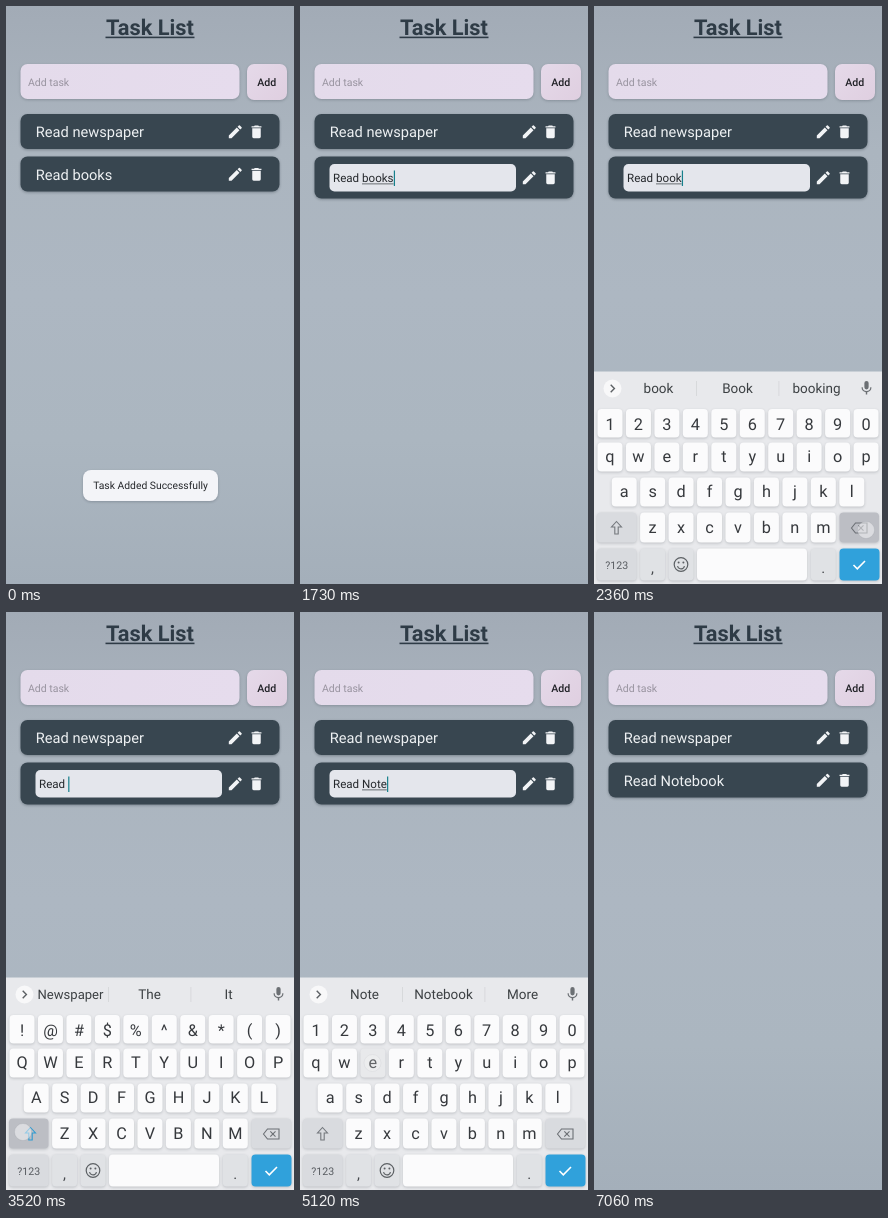
An HTML page with a canvas that plays this animation: 288 by 578 pixels, repeating every 7300 ms.

```html
<!DOCTYPE html>
<html lang="en">
<head>
<meta charset="utf-8">
<title>Task List</title>
<style>
html, body { margin: 0; width: 100%; height: 100%; overflow: hidden; background: #abb5c0; }
canvas { display: block; width: 288px; height: 578px; }
</style>
</head>
<body>
<canvas id="stage"></canvas>
<script>
const W = 288, H = 578, LOOP = 7300;
const canvas = document.getElementById('stage');
const ctx = canvas.getContext('2d');
const dpr = window.devicePixelRatio || 1;
canvas.width = W * dpr;
canvas.height = H * dpr;
ctx.scale(dpr, dpr);
ctx.textRendering = 'geometricPrecision';

const PENCIL = new Path2D('M3 17.25V21h3.75L17.81 9.94l-3.75-3.75L3 17.25zM20.71 7.04a1 1 0 0 0 0-1.41l-2.34-2.34a1 1 0 0 0-1.41 0l-1.83 1.83 3.75 3.75 1.83-1.83z');
const TRASH = new Path2D('M6 19a2 2 0 0 0 2 2h8a2 2 0 0 0 2-2V7H6v12zM19 4h-3.5l-1-1h-5l-1 1H5v2h14V4z');
const MIC = new Path2D('M12 14a3 3 0 0 0 3-3V5a3 3 0 0 0-6 0v6a3 3 0 0 0 3 3zm5.3-3a5.3 5.3 0 0 1-10.6 0H5a7 7 0 0 0 6 6.9V21h2v-3.1A7 7 0 0 0 19 11z');

const EDIT = 1610, KB_IN = 1760, SHIFT = 3480, UNSHIFT = 3800, DONE = 6570;

// [time, word being typed, suggestions]
const STEPS = [
  [0, 'books', 'books Books bookstore'],
  [2330, 'book', 'book Book booking'],
  [2540, 'boo', 'boo Boo book'],
  [2720, 'bo', 'bo Bo both'],
  [2880, 'b', 'b be by'],
  [3000, '', 'newspaper the it'],
  [SHIFT, '', 'Newspaper The It'],
  [UNSHIFT, 'N', 'N Not New'],
  [4210, 'No', 'No Not Now'],
  [4590, 'Not', 'Not Note Nothing'],
  [4970, 'Note', 'Note Notebook More'],
  [5250, 'Noteb', 'Noteb Notebook Notebooks'],
  [5530, 'Notebo', 'Notebo Notebook Notebooks'],
  [5790, 'Noteboo', 'Noteboo Notebook Notebooks'],
  [6170, 'Notebook', 'Notebook Notebooks']
];

// [start, end, key, touch x, touch y]
const PRESSES = [
  [2320, 3060, 'back', 272, 524], [3460, 3580, 'shift', 17, 520],
  [3770, 3880, 'n', 201, 521], [4190, 4290, 'o', 243.5, 451],
  [4560, 4660, 't', 129.5, 451], [4940, 5040, 'e', 72.5, 451],
  [5220, 5320, 'b', 172.5, 521], [5500, 5600, 'o', 243.5, 451],
  [5770, 5860, 'o', 243.5, 451], [6140, 6240, 'k', 229.5, 486],
  [6520, 6610, 'enter', 265, 559]
];

const clamp = v => Math.max(0, Math.min(1, v));
const span = (t, a, b) => clamp((t - a) / (b - a));
const easeOut = p => 1 - (1 - p) ** 3;

function box(x, y, w, h, r, fill, shadow = 0) {
  ctx.save();
  if (shadow) {
    ctx.shadowColor = `rgba(30,40,50,${shadow})`;
    ctx.shadowBlur = 3 * dpr;
    ctx.shadowOffsetY = dpr;
  }
  ctx.fillStyle = fill;
  ctx.beginPath();
  ctx.roundRect(x, y, w, h, r);
  ctx.fill();
  ctx.restore();
}

function text(str, x, y, size, color, align = 'left', weight = 400) {
  ctx.font = `${weight} ${size}px Roboto, "Noto Sans", sans-serif`;
  ctx.textAlign = align;
  ctx.fillStyle = color;
  ctx.fillText(str, x, y);
  return ctx.measureText(str).width;
}

function icon(path, cx, cy, size, color) {
  ctx.save();
  ctx.translate(cx - size / 2, cy - size / 2);
  ctx.scale(size / 24, size / 24);
  ctx.fillStyle = color;
  ctx.fill(path);
  ctx.restore();
}

function poly(points, color, width, close) {
  ctx.beginPath();
  points.forEach(([x, y]) => ctx.lineTo(x, y));
  if (close) ctx.closePath();
  ctx.strokeStyle = color;
  ctx.lineWidth = width;
  ctx.stroke();
}

function disc(x, y, r, fill) {
  ctx.beginPath();
  ctx.arc(x, y, r, 0, 7);
  ctx.fillStyle = fill;
  ctx.fill();
}

function blend(x0, y0, x1, y1, ...colors) {
  const g = ctx.createLinearGradient(x0, y0, x1, y1);
  colors.forEach((c, i) => g.addColorStop(i / (colors.length - 1), c));
  return g;
}

function header() {
  ctx.fillStyle = blend(0, 0, 0, H, '#a2abb6', '#abb5bf', '#adb7c2', '#abb6c0', '#a4afba');
  ctx.fillRect(0, 0, W, H);
  text('Task List', 144, 28.5, 21.8, '#2e3b46', 'center', 700);
  ctx.fillStyle = '#2e3b46';
  ctx.fillRect(99.5, 30.6, 89, 1.6);
  box(14.5, 58, 219, 35, 7, blend(14, 58, 233, 93, '#e4dbeb', '#e6dced'), 0.25);
  text('Add task', 22, 79.5, 10.5, '#98939f');
  box(241, 58, 40, 36, 7, blend(241, 58, 281, 94, '#e5d9e9', '#dfcfe0'), 0.25);
  text('Add', 260.7, 79.8, 10.6, '#202126', 'center', 500);
}

function row(y, h) {
  box(14.5, y, 259, h, 7, '#384650', 0.35);
  icon(PENCIL, 229.3, y + h / 2 + 0.3, 17.3, '#f2f4f6');
  icon(TRASH, 250.5, y + h / 2 + 0.3, 17, '#f2f4f6');
}

function rows(t, word) {
  row(108, 35);
  text('Read newspaper', 29.8, 131.4, 14.65, '#eef1f3');
  if (t < EDIT || t >= DONE) {
    row(150.5, 35);
    text('Read ' + word, 29.8, 173.9, 14.65, '#eef1f3');
    return;
  }
  row(150.5, 42);
  box(29.5, 158, 186.5, 27.5, 5, '#e4e6ec');
  const start = 33 + text('Read ', 33, 176, 11.6, '#25282c');
  const width = text(word, start, 176, 11.6, '#25282c');
  ctx.fillStyle = '#4b5055';
  ctx.fillRect(start, 177.5, width, 0.8);
  ctx.fillStyle = '#16808c';
  ctx.fillRect(start + width + 0.2, 164.5, 1.2, 15.5);
}

function toast(alpha) {
  if (!alpha) return;
  ctx.globalAlpha = alpha;
  box(77, 464, 135, 31, 8, '#f3f4f8', 0.25);
  text('Task Added Successfully', 144.5, 483.3, 10.35, '#25272b', 'center');
  ctx.globalAlpha = 1;
}

function suggestions(list) {
  disc(18.5, 382.5, 9, '#f8f8f9');
  poly([[16.7, 378.8], [20.4, 382.5], [16.7, 386.2]], '#5c6064', 1.4);
  list.forEach((s, i) => {
    const x = 64.5 + i * 79;
    ctx.font = '13.5px Roboto, "Noto Sans", sans-serif';
    const fit = Math.min(1, 66 / ctx.measureText(s).width);
    text(s, x, 387.2, 13.5 * fit, '#3c4043', 'center');
  });
  ctx.fillStyle = '#d3d5d8';
  for (let i = 1; i < Math.max(2, list.length); i++) ctx.fillRect(19.5 + i * 82.5, 375, 0.8, 15);
  icon(MIC, 272.5, 382, 17, '#6c7074');
}

function keyboard(t, list) {
  const hidden = 1 - easeOut(span(t, KB_IN, 2020)) + span(t, DONE, 6800) ** 2;
  if (hidden >= 1) return;
  const upper = t >= SHIFT && t < UNSHIFT;
  const glow = key => Math.max(0, ...PRESSES.map(([a, b, k]) =>
    k === key && t >= a ? 1 - span(t, b, b + 150) : 0));

  function key(name, x, y, w, h, fill = '#fbfbfc') {
    box(x, y, w, h, 4, fill, 0.22);
    const g = glow(name);
    if (g) box(x, y, w, h, 4, `rgba(120,124,132,${0.3 * g})`);
  }
  function letters(chars, x, y, h, base) {
    [...chars].forEach((c, i) => {
      const cx = x + i * 28.45;
      key(c, cx - 12.5, y, 25, h);
      text(upper ? c.toUpperCase() : c, cx, base, 16.3, '#36393d', 'center');
    });
  }

  ctx.save();
  ctx.translate(0, hidden * 213);
  ctx.fillStyle = '#e8e9ec';
  ctx.fillRect(0, 365.5, W, 213);
  suggestions(list);
  letters(upper ? '!@#$%^&*()' : '1234567890', 16, 403, 28.5, 423.7);
  letters('qwertyuiop', 16, 436.5, 29, 456.3);
  letters('asdfghjkl', 30.2, 471.5, 29, 491.3);
  letters('zxcvbnm', 58.6, 506.5, 30, 527.3);

  key('shift', 3, 506.5, 39.5, 30, '#d9dbdf');
  const s = upper ? 24.5 : 22.5;
  poly([[s, 515.5], [s + 5, 521], [s + 1.7, 521], [s + 1.7, 528], [s - 1.7, 528], [s - 1.7, 521], [s - 5, 521]],
    upper ? '#2f9bd2' : '#74787d', 1.1, true);
  key('back', 245.5, 506.5, 39.5, 30, '#d9dbdf');
  poly([[257.5, 522], [261.5, 517], [273, 517], [273, 527], [261.5, 527]], '#6b6f74', 1.1, true);
  poly([[264.3, 519.4], [269.5, 524.6]], '#6b6f74', 1.1);
  poly([[269.5, 519.4], [264.3, 524.6]], '#6b6f74', 1.1);

  key('sym', 3, 542.5, 39.5, 32, '#d9dbdf');
  text('?123', 22.7, 562.5, 10.6, '#585c61', 'center');
  key(',', 46.1, 542.5, 25, 32, '#e0e2e5');
  text(',', 58.6, 567, 15, '#45484c', 'center');
  key('emoji', 74.6, 542.5, 25, 32, '#e0e2e5');
  ctx.strokeStyle = '#5c6064';
  ctx.lineWidth = 1.2;
  ctx.beginPath();
  ctx.arc(87, 558.5, 6.8, 0, 7);
  ctx.stroke();
  ctx.beginPath();
  ctx.arc(87, 559.3, 3.6, 0.25, Math.PI - 0.25);
  ctx.stroke();
  disc(84.6, 556.5, 1, '#5c6064');
  disc(89.4, 556.5, 1, '#5c6064');
  key('space', 103, 542.5, 110, 32);
  key('.', 216.8, 542.5, 25, 32, '#e0e2e5');
  text('.', 229.3, 567, 15, '#45484c', 'center');
  key('enter', 245.5, 542.5, 40, 32, '#30a1db');
  poly([[259.5, 559], [263.3, 562.8], [271, 555]], '#fff', 1.6);
  ctx.restore();
}

function touches(t) {
  for (const [a, b, , x, y] of PRESSES) {
    if (t < a || t > b + 150) continue;
    const alpha = 0.5 * (1 - span(t, b, b + 150));
    disc(x, y, 8.5, `rgba(250,250,252,${alpha})`);
    ctx.strokeStyle = `rgba(150,155,162,${alpha * 0.6})`;
    ctx.lineWidth = 0.8;
    ctx.stroke();
  }
  const tap = span(t, 1560, 1590) * (1 - span(t, 1620, 1710));
  if (tap) disc(230, 170, 8.5, `rgba(250,250,252,${0.5 * tap})`);
}

function draw(now) {
  const t = now % LOOP;
  const [, word, list] = STEPS.findLast(step => step[0] <= t);
  header();
  rows(t, word);
  toast(1 - span(t, 790, 1060));
  keyboard(t, list.split(' '));
  touches(t);
}

const begin = performance.now();
function tick() {
  draw(performance.now() - begin);
  requestAnimationFrame(tick);
}
tick();
</script>
</body>
</html>
```
